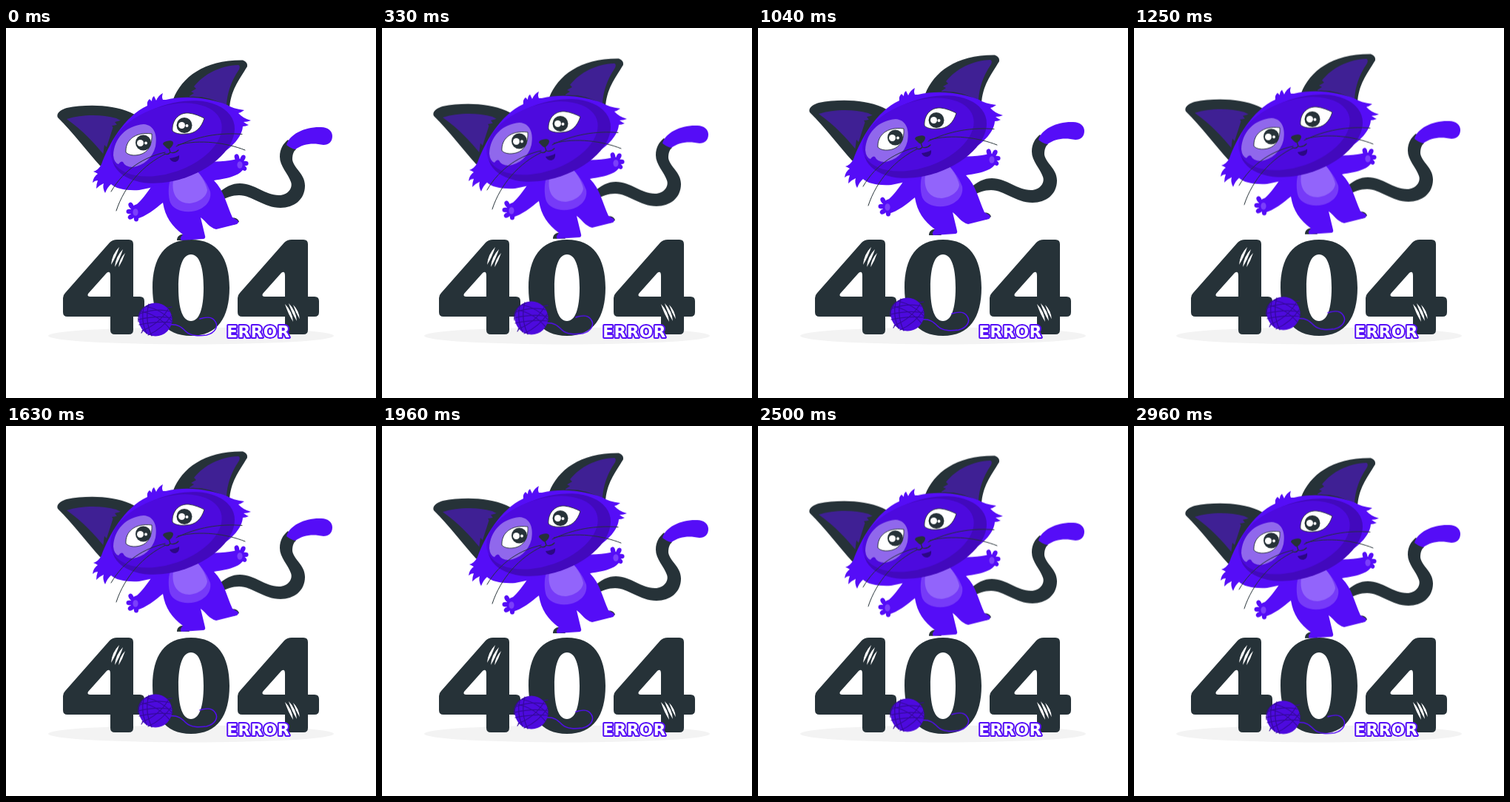
These frames come from a looping animation (500 px wide and 500 px high, 3000 ms). An HTML page without scripts:

```html
<!DOCTYPE html>
<html lang="en">
<head>
<meta charset="utf-8">
<title>404 error</title>
<style>
  html, body { margin: 0; width: 100%; height: 100%; overflow: hidden; background: #fff; }
  svg { display: block; width: 100vw; height: 100vh; }
  .ink { fill: #263238; }
  .fur { fill: #550df7; }
  .white { fill: #fff; }
  .ear { fill: #3f2094; }
  .pad { fill: #7b3ffa; }
  .line { fill: none; stroke: #263238; stroke-linecap: round; }
  .thread { fill: none; stroke: #35099c; stroke-width: 1.2; stroke-linecap: round; }
  .string { fill: none; stroke: #550df7; stroke-width: 1.5; stroke-linecap: round; }
  .label {
    font: 700 21.5px "DejaVu Sans", Verdana, sans-serif; letter-spacing: .6px;
    fill: #fff; stroke: #550df7; stroke-width: 4px; stroke-linejoin: round; paint-order: stroke;
  }
  .float { animation: float 3s linear infinite; }
  @keyframes float { 50% { transform: translateY(-10px); } }
</style>
</head>
<body>
<svg viewBox="0 0 500 500">
  <defs>
    <path id="four" fill-rule="evenodd" d="M150 286H166Q172 286 172 292V363H181Q187 363 187 369V384Q187 390 181 390H172V408Q172 414 166 414H147Q141 414 141 408V390H83Q77 390 77 384V365Q77 361 80 358L140 290Q144 286 150 286ZM141 335Q141 327 136 331L111 359Q109 363 114 363H141Z"/>
    <path id="scratch" d="M0 0Q-10 10 -11 24Q-4 13 0 0Z"/>
  </defs>

  <ellipse cx="250" cy="416" rx="193" ry="11.5" fill="#f3f3f3"/>

  <g class="ink">
    <use href="#four"/>
    <use href="#four" x="236"/>
    <path fill-rule="evenodd" d="M250 286C286 286 302 311 302 351S286 416 250 416S198 391 198 351S214 286 250 286ZM250 306C239 306 233 322 233 351S239 396 250 396S267 380 267 351S261 306 250 306Z"/>
  </g>
  <g class="white">
    <use href="#scratch" x="153" y="296"/>
    <use href="#scratch" x="158" y="299"/>
    <use href="#scratch" transform="translate(161 304) scale(.8)"/>
    <g transform="scale(-1 1)">
      <use href="#scratch" x="-377" y="373"/>
      <use href="#scratch" x="-382" y="372"/>
      <use href="#scratch" transform="translate(-388 374) scale(.8)"/>
    </g>
  </g>

  <g class="float">
    <!-- tail -->
    <path class="ink" d="M284 226C296 214 306 210 316 210C336 210 350 226 369 226C381 226 388 216 385 208C381 196 370 187 370 174C370 163 375 156 381 151L392 164C388 167 387 172 387 178C389 190 404 197 404 213C404 232 389 243 371 243C348 243 333 226 315 226C306 226 297 229 288 235Z"/>
    <path class="fur" d="M379 158C383 143 405 133 426 134C435 134 441 139 441 146C441 154 436 158 429 158C415 155 402 156 391 164Q385 163 379 158Z"/>

    <!-- feet and body -->
    <path class="ink" d="M231 287C231 281 236 278 242 279L248 287ZM301 258C307 255 314 257 315 262L308 266Z"/>
    <path class="fur" d="M198 212C191 222 184 232 177 238C166 241 165 254 176 258C189 255 202 244 212 236C215 255 224 268 239 279Q234 284 237 287L267 285Q270 284 269 281L263 256C270 261 275 270 284 272L312 265Q315 263 313 260L306 256C298 239 295 220 281 206C291 204 302 203 310 199C321 195 325 185 322 180Q316 174 308 178C298 180 285 181 274 180L240 170Z"/>
    <g class="fur">
      <ellipse cx="169" cy="240" rx="3.2" ry="4.5" transform="rotate(-28 169 240)"/>
      <ellipse cx="167" cy="248" rx="4.5" ry="3.2"/>
      <ellipse cx="169" cy="255" rx="4.5" ry="3.3" transform="rotate(-30 169 255)"/>
      <ellipse cx="176" cy="257" rx="3.2" ry="4.5"/>
      <ellipse cx="312" cy="175" rx="3.2" ry="4.7" transform="rotate(-15 312 175)"/>
      <ellipse cx="320" cy="176" rx="3.2" ry="4.7" transform="rotate(25 320 176)"/>
      <ellipse cx="323" cy="183" rx="4.6" ry="3.2"/>
      <ellipse cx="321" cy="189" rx="4.6" ry="3.2" transform="rotate(35 321 189)"/>
    </g>
    <ellipse class="pad" cx="175" cy="249" rx="3.6" ry="4.8"/>
    <ellipse class="pad" cx="316" cy="185" rx="3.6" ry="4.8"/>
    <path fill="#763af8" d="M222 205C226 196 236 191 250 187C262 195 271 208 276 221C278 233 270 243 256 247C240 251 226 245 222 236C219 228 219 213 222 205Z"/>
    <path fill="#9264fb" d="M226 206C230 197 240 191 251 187C262 195 270 209 272 219C271 229 259 236 248 237C233 237 223 226 226 206Z"/>

    <!-- ears -->
    <path class="ink" d="M70 121C67 115 75 110 82 108C108 103 143 103 168 114L190 125L150 196L127 186C110 167 92 143 70 121Z"/>
    <path class="ear" d="M82 123C101 117 128 116 149 122L155 125L147 127L150 131L143 132L146 136L180 140L138 180L133 172C119 155 103 138 82 123Z"/>
    <path class="ink" d="M145 133L151 130L150 127L157 124L170 125L130 180L133 158L136 161Z"/>
    <path class="ink" d="M226 96C238 66 268 43 320 43.500Q327 46 326 52C315 70 303 85 302 110L260 120Z"/>
    <path class="ear" d="M314 50Q317 51 315 56C304 72 299 88 298 104L248 98L248 92L254 88L250 86L257 82L254 79C268 62 289 51 314 50Z"/>
    <path class="ink" d="M246 93Q275 91 299 106L240 104Z"/>

    <!-- head -->
    <path class="fur" d="M191 105Q190 99 194 96L197 99Q197 94 200 92L203 98Q206 91 212 88Q210 93 212 97L216 97C245 90 277 95 299 104Q306 109 322 111Q318 114 314 115Q320 122 331 125Q326 127 321 127Q325 130 328 131Q324 133 320 133C319 147 306 161 288 172C260 190 226 211 180 219C162 220 148 217 142 211Q137 215 134 223Q130 216 132 210Q127 212 122 217Q122 211 124 206Q120 206 117 209Q118 201 124 197Q121 195 118 194Q125 192 129 184C139 157 159 120 191 105Z"/>
    <g transform="translate(226 154) rotate(-19)">
      <ellipse rx="86" ry="51" fill="#4209bd"/>
      <ellipse cx="-8" cy="-6" rx="78" ry="45" fill="#4d0ade"/>
    </g>
    <path fill="#9068ec" d="M145 172C146 149 162 132 186 130C200 131 205 144 202 160C198 176 186 186 171 188Q161 188 158 181Q155 179 152 184Q146 182 145 172Z"/>

    <!-- eyes -->
    <g class="white" stroke="#263238" stroke-width=".9">
      <path d="M162 168C161 152 174 140 197 143C198 156 193 168 181 171C173 173 166 172 162 168Z"/>
      <path d="M225 139C224 125 233 114 247 115C255 116 262 119 268 122C264 135 256 143 243 143C234 144 228 142 225 139Z"/>
    </g>
    <circle class="ink" cx="185.500" cy="155" r="10.5"/>
    <circle class="ink" cx="241" cy="131.500" r="10.5"/>
    <g class="white">
      <circle cx="181.500" cy="155.500" r="4.5"/>
      <circle cx="189" cy="155.500" r="2"/>
      <circle cx="237.500" cy="131.500" r="4.5"/>
      <circle cx="244.500" cy="132" r="2"/>
    </g>

    <!-- nose, mouth, whiskers -->
    <path class="ink" d="M212 157Q212 154 217 153Q225 151 226 155Q226 159 221 163Q219 164 217 162Z"/>
    <path class="line" stroke-width="1.3" d="M220 162L222 168Q219 172 214 170M222 168Q228 170 233 165"/>
    <path fill="#2b0883" d="M221 176Q229 175 234 172Q235 179 229 181Q223 181 221 176Z"/>
    <path class="line" d="M230 160C258 146 290 141 319 143.500M232 158C262 150 298 155 323 165M215 168C188 174 160 190 142 221M216 170C186 184 160 213 149 247"/>

    <!-- yarn -->
    <path class="string" d="M222 401C232 400 237 404 243 410C250 417 262 416 271 415C283 412 287 403 283 397C279 389 268 391 262 393"/>
    <circle cx="202" cy="394" r="22.500" fill="#4d0ade"/>
    <g class="thread">
      <path d="M181 386Q203 378 222 383M179 394Q204 388 225 392M180 401Q203 396 224 398"/>
      <path d="M186 378Q182 396 190 413M193 373Q187 395 197 416"/>
      <path d="M183 383Q206 388 221 406M189 376Q211 381 225 397M184 409Q207 400 219 380M192 415Q212 406 224 388"/>
      <path d="M179 397Q177 379 196 373M185 409L183 412M218 378L224 377"/>
    </g>
  </g>

  <text class="label" x="298.200" y="417.500">ERROR</text>
</svg>
</body>
</html>
```
